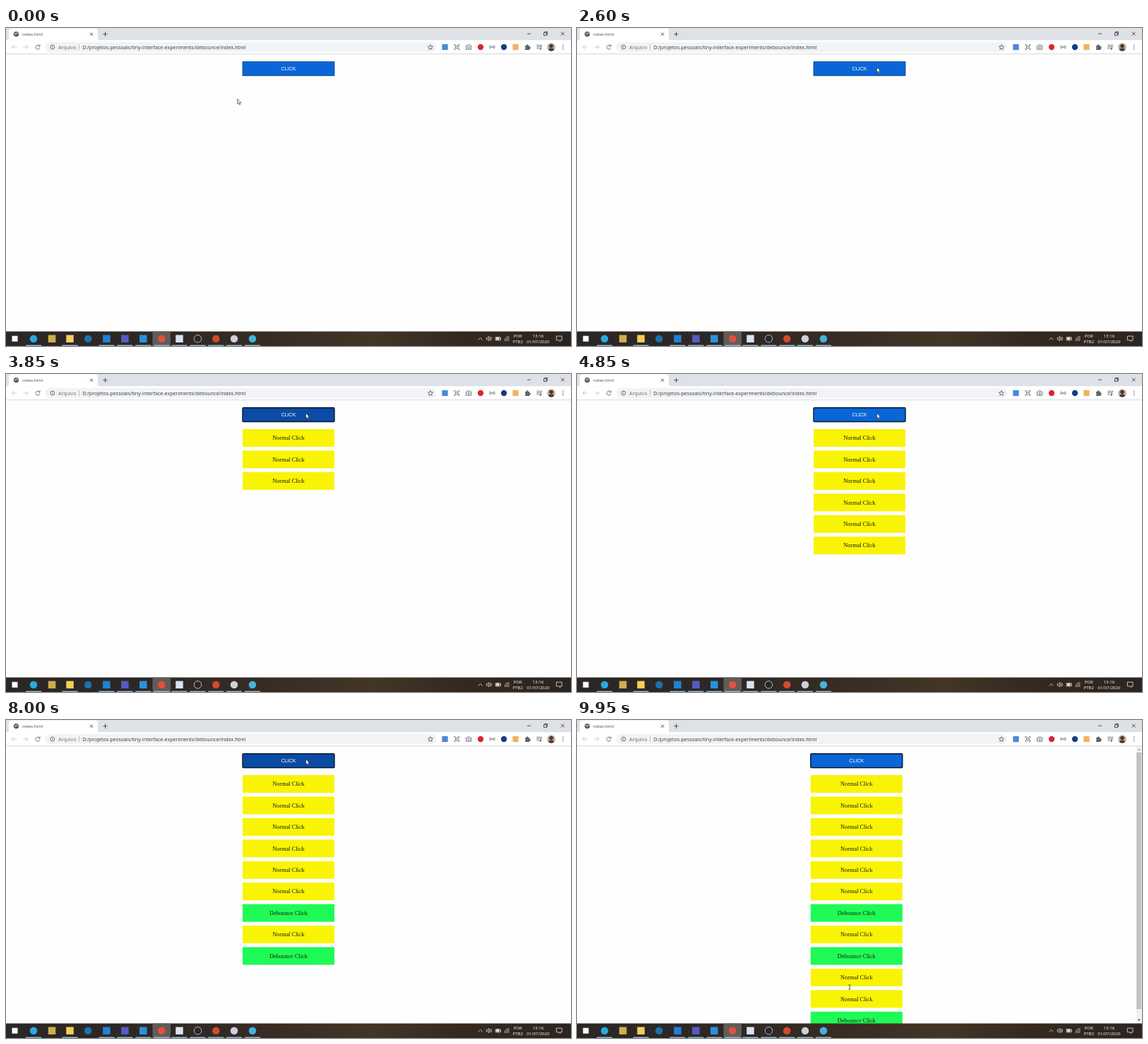
An HTML page for the animation above (10000 ms loop, 800x450 px).

```html
<!DOCTYPE html>
<html lang="pt-BR">
<head>
<meta charset="utf-8">
<title>Debounce</title>
<style>
  html, body { margin: 0; width: 100%; height: 100%; overflow: hidden; background: #fff; }
  svg { display: block; width: 800px; height: 450px; }
  text { font-family: "Open Sans", "Noto Sans", sans-serif; }
  .mid { text-anchor: middle; }
  .row text { font: 8.33px "Liberation Serif", "Times New Roman", serif; fill: #1c1c10; }
  .btn text { font: 7.15px "Liberation Sans", Arial, sans-serif; fill: #fff; }
  .line { fill: none; stroke: #5f6368; stroke-width: .9; }
  .tray { fill: none; stroke: #f2f2f2; stroke-width: .75; }
  .clock { font-size: 6.1px; fill: #fff; }
</style>
</head>
<body>
<svg viewBox="0 0 800 450">
  <defs>
    <linearGradient id="bar">
      <stop offset="0" stop-color="#2b2725"/>
      <stop offset=".3" stop-color="#2f2824"/>
      <stop offset=".5" stop-color="#3a2d23"/>
      <stop offset=".65" stop-color="#433527"/>
      <stop offset=".8" stop-color="#35291f"/>
      <stop offset="1" stop-color="#2b2420"/>
    </linearGradient>
    <clipPath id="face"><circle cx="772" cy="27" r="5.8"/></clipPath>
  </defs>
  <rect width="800" height="450" fill="#fefefe"/>

  <g id="page">
    <g class="btn">
      <rect id="fill" x="335" y="47.7" width="130" height="19.8"/>
      <text class="mid" x="400" y="59.8">CLICK</text>
    </g>
    <g id="rows"></g>
  </g>

  <g id="scroll">
    <rect x="791.5" y="37" width="8.5" height="393" fill="#f1f1f1"/>
    <rect x="792.3" y="46" width="6.8" height="363" fill="#c1c1c1"/>
    <path d="M793.8 43l2-2.4 2 2.4z" fill="#a0a0a0"/>
    <path d="M793.8 423.5l2 2.4 2-2.4z" fill="#505050"/>
  </g>

  <!-- browser -->
  <rect width="800" height="17.5" fill="#dee1e6"/>
  <path d="M1 17.5q3 0 3-3V4q0-3.5 3.5-3.5h119Q130 .5 130 4v10.500q0 3 3 3z" fill="#fff"/>
  <rect y="17.300" width="800" height="19.200" fill="#fff"/>
  <rect y="36.300" width="800" height=".9" fill="#d3d5d8"/>
  <circle cx="14.500" cy="8.600" r="3.700" fill="#50555b"/>
  <path d="M11.800 7.200l2.500.8-.6 2.200M15.300 5.800l.4 1.600 1.900.7" fill="none" stroke="#fff" stroke-width=".8"/>
  <text x="23" y="10.700" font-size="5.9" fill="#45494d">index.html</text>
  <path class="line" stroke-width="1" d="M119 6.700l4 4m0-4l-4 4M140.500 5.500v6.400m-3.200-3.200h6.400" style="stroke:#3c4043"/>
  <path class="line" d="M738 8.200h5M761.500 6.700h3.800v3.800h-3.800zM762.700 6.500v-1.100h3.800v3.900h-1.200M785.800 5.700l4.800 4.800m0-4.800l-4.800 4.800" style="stroke:#222;stroke-width:.75"/>
  <path class="line" d="M15 27H8.300m3-3l-3 3 3 3M24.500 27h6.700m-3-3l3 3-3 3" style="stroke:#c2c4c7"/>
  <path class="line" d="M47.300 25.200a3 3 0 1 0 .6 2.600M48 23.400v2.500h-2.500"/>
  <rect x="55.500" y="20" width="553.500" height="14" rx="7" fill="#f1f3f4"/>
  <circle class="line" cx="65.800" cy="27" r="3"/>
  <path class="line" d="M65.800 26.500v2.200M65.800 25v.8"/>
  <text x="74" y="29.600" font-size="7.05" fill="#6b6f74">Arquivo</text>
  <rect x="103.200" y="23" width=".7" height="8" fill="#a5a8ac"/>
  <text x="108.200" y="29.600" font-size="7.1" fill="#35383c">D:/projetos-pessoais/tiny-interface-experiments/debounce/index.html</text>
  <path class="line" d="M601 23.500l1 2.400 2.600.2-2 1.700.6 2.600-2.200-1.400-2.200 1.400.6-2.600-2-1.700 2.600-.2z"/>
  <path class="line" d="M634.900 25.200v-1.600h1.800M640 23.600h1.800v1.600M641.800 28.800v1.600H640M636.700 30.400h-1.800v-1.600M636.500 25.500h3.700v3h-3.700z"/>
  <path class="line" d="M651.600 25h1.800l.8-1.200h2l.8 1.200h1.700v5.200h-7.100z"/>
  <circle class="line" cx="655.200" cy="27.500" r="1.300"/>
  <circle cx="688.400" cy="27" r="1" fill="#5f6368"/>
  <path class="line" d="M686.600 25.200q-1.200 1.800 0 3.600M690.200 25.200q1.200 1.800 0 3.600M685.500 24.400q-1.800 2.600 0 5.200M691.300 24.400q1.800 2.600 0 5.200" style="stroke-width:.7"/>
  <path d="M735 25h2v-.5a1.200 1.200 0 0 1 2.400 0v.5h1.900v2h.4a1.200 1.200 0 0 1 0 2.400h-.4v1.600H735v-1.700a1.200 1.200 0 0 0 0-2.200z" fill="#5f6368"/>
  <path class="line" d="M751.300 24.300h5.200M751.300 26.600h5.200M751.300 28.900h3M757.500 29.500v-5.200h1.700"/>
  <circle cx="756.600" cy="29.500" r="1.200" fill="#5f6368"/>
  <g clip-path="url(#face)">
    <rect x="766" y="21" width="12" height="12" fill="#c2b09d"/>
    <circle cx="772" cy="25.500" r="2.800" fill="#493a34"/>
    <ellipse cx="772" cy="32.500" rx="5" ry="4" fill="#493a34"/>
  </g>
  <g fill="#5f6368"><circle cx="788.700" cy="24.200" r=".8"/><circle cx="788.700" cy="27" r=".8"/><circle cx="788.700" cy="29.800" r=".8"/></g>

  <!-- taskbar -->
  <rect y="429.400" width="800" height="20.600" fill="url(#bar)"/>
  <rect x="207.500" y="429.400" width="25.500" height="20.600" fill="#625b56"/>
  <g id="marks"></g>
  <g class="tray">
    <path d="M668.700 441.300l2.900-2.900 2.900 2.900"/>
    <path d="M680.300 438.300h1.500l2-1.800v6.200l-2-1.800h-1.500zM685.200 437.900q1 1.700 0 3.400M686.600 436.800q1.800 2.800 0 5.600"/>
    <path d="M693.200 437.500h6.600v4.400h-6.600zM700.500 438.800v1.800"/>
    <path d="M694.300 438.600h3.700v2.200h-3.700z" fill="#f2f2f2"/>
    <path d="M706.200 442.800q.2-5.800 6.400-6M708.300 442.900q.2-3.700 4.300-3.900M710.400 443q.2-1.800 2.200-1.900"/>
    <path d="M779.300 436h7.800v5.800h-2.500v1.800l-1.800-1.800h-3.500z"/>
  </g>
  <g class="clock mid">
    <text x="724.800" y="437.800">POR</text>
    <text x="724.800" y="446.300">PTB2</text>
    <text x="753.400" y="437.800">13:16</text>
    <text x="753.400" y="446.300">01/07/2020</text>
  </g>

  <path id="arrow" d="M0 0v7.200l1.700-1.500 1.100 2.600 1.300-.6-1.100-2.500h2.200z" fill="#fff" stroke="#222" stroke-width=".65"/>
  <path id="beam" d="M-1.600-3.300q1.600 0 1.600.7q0-.7 1.600-.7M0-2.600v5.200M-1.600 3.300q1.600 0 1.600-.7q0 .7 1.600.7" fill="none" stroke="#222" stroke-width=".75"/>
</svg>
<script>
const LOOP = 10000, HOLD = 120, DELAY = 1000;
const presses = [2890, 3200, 3510, 3820, 4130, 4440, 6300, 7950, 8140];
// time, x, y
const path = [[0, 327.7, 100.300], [300, 327.7, 100.300], [1050, 424.600, 55.600],
              [9330, 424.600, 55.600], [9850, 386, 378], [LOOP, 386, 378]];
const $ = id => document.getElementById(id);

function add(parent, tag, attrs, text = '') {
  const el = document.createElementNS(parent.namespaceURI, tag);
  for (const k in attrs) el.setAttribute(k, attrs[k]);
  el.textContent = text;
  return parent.appendChild(el);
}

function mark(x, y, size, color, round, extra) {
  const r = size / 2;
  add($('marks'), 'rect', { x: x - r, y: y - r, width: size, height: size,
    rx: round ? r : 0, fill: color, ...extra });
}

// x, colour, round, running
[[12.500, '#fff', 0, 0], [39, '#2aa9e0', 1, 1], [65, '#cfae4d', 0, 0],
 [90.500, '#f6cd58', 0, 1], [116.200, '#1b72ad', 1, 0], [142.400, '#1f82d2', 0, 1],
 [168.400, '#565bc2', 0, 1], [194.300, '#2a92dc', 0, 1], [220.300, '#df5142', 1, 1],
 [245.500, '#d9e2f3', 0, 1], [271.500, '#29272a', 1, 1], [297.300, '#d24a2b', 1, 1],
 [323, '#cbd0da', 1, 1], [349, '#45b2dd', 1, 1]
].forEach(([x, color, round, on], i) => {
  const ring = i === 10 ? { stroke: '#ddd', 'stroke-width': .8 } : {};
  mark(x, 439.700, i ? 10.500 : 8, color, round, ring);
  if (on) add($('marks'), 'rect', { x: x - 11, y: 448.600, width: 22, height: 1.400, fill: '#8fbbe0' });
});
[[621.500, '#4b87dc', 0], [672, '#d9272d', 1], [705, '#153d82', 1], [721.500, '#f1b35c', 0]]
  .forEach(([x, color, round]) => mark(x, 27, 8.300, color, round));

// every release adds a normal row; a quiet second adds a debounced one
const rows = [];
presses.forEach((t, i) => {
  const up = t + HOLD, fire = up + DELAY;
  rows.push({ at: up, name: 'Normal Click', color: '#f9f306' });
  if (!(presses[i + 1] + HOLD < fire)) rows.push({ at: fire, name: 'Debounce Click', color: '#1ffa56' });
});
rows.forEach((row, i) => {
  const y = 78 + i * 30.430;
  row.el = add($('rows'), 'g', { class: 'row' });
  add(row.el, 'rect', { x: 335, y, width: 130, height: 25, fill: row.color });
  add(row.el, 'text', { class: 'mid', x: 400, y: y + 15.300 }, row.name);
});

const show = (el, on) => el.setAttribute('visibility', on ? 'visible' : 'hidden');

function pointer(t) {
  const i = path.findIndex(p => p[0] > t);
  const [t0, x0, y0] = path[i - 1], [t1, x1, y1] = path[i];
  const u = (t - t0) / (t1 - t0), e = u * u * (3 - 2 * u);
  return [x0 + (x1 - x0) * e, y0 + (y1 - y0) * e];
}

function draw(t) {
  const down = presses.some(p => t >= p && t < p + HOLD);
  const focus = t >= presses[0];
  const full = t >= rows[rows.length - 1].at;
  const fill = $('fill');
  fill.setAttribute('fill', down ? '#0a4ba6' : '#0a66d6');
  fill.setAttribute('stroke', focus ? '#101828' : '#0b4690');
  fill.setAttribute('stroke-width', focus ? 1.400 : .8);
  fill.setAttribute('rx', focus ? 1.200 : 0);
  rows.forEach(r => show(r.el, t >= r.at));
  show($('scroll'), full);
  $('page').setAttribute('transform', `translate(${full ? -4.200 : 0} 0)`);

  const [x, y] = pointer(t);
  const text = t > 9000 && y > 78 && x < 421;
  for (const id of ['arrow', 'beam']) $(id).setAttribute('transform', `translate(${x} ${y})`);
  show($('arrow'), !text);
  show($('beam'), text);
}

const start = performance.now();
function tick() {
  draw((performance.now() - start) % LOOP);
  requestAnimationFrame(tick);
}
tick();
</script>
</body>
</html>
```
